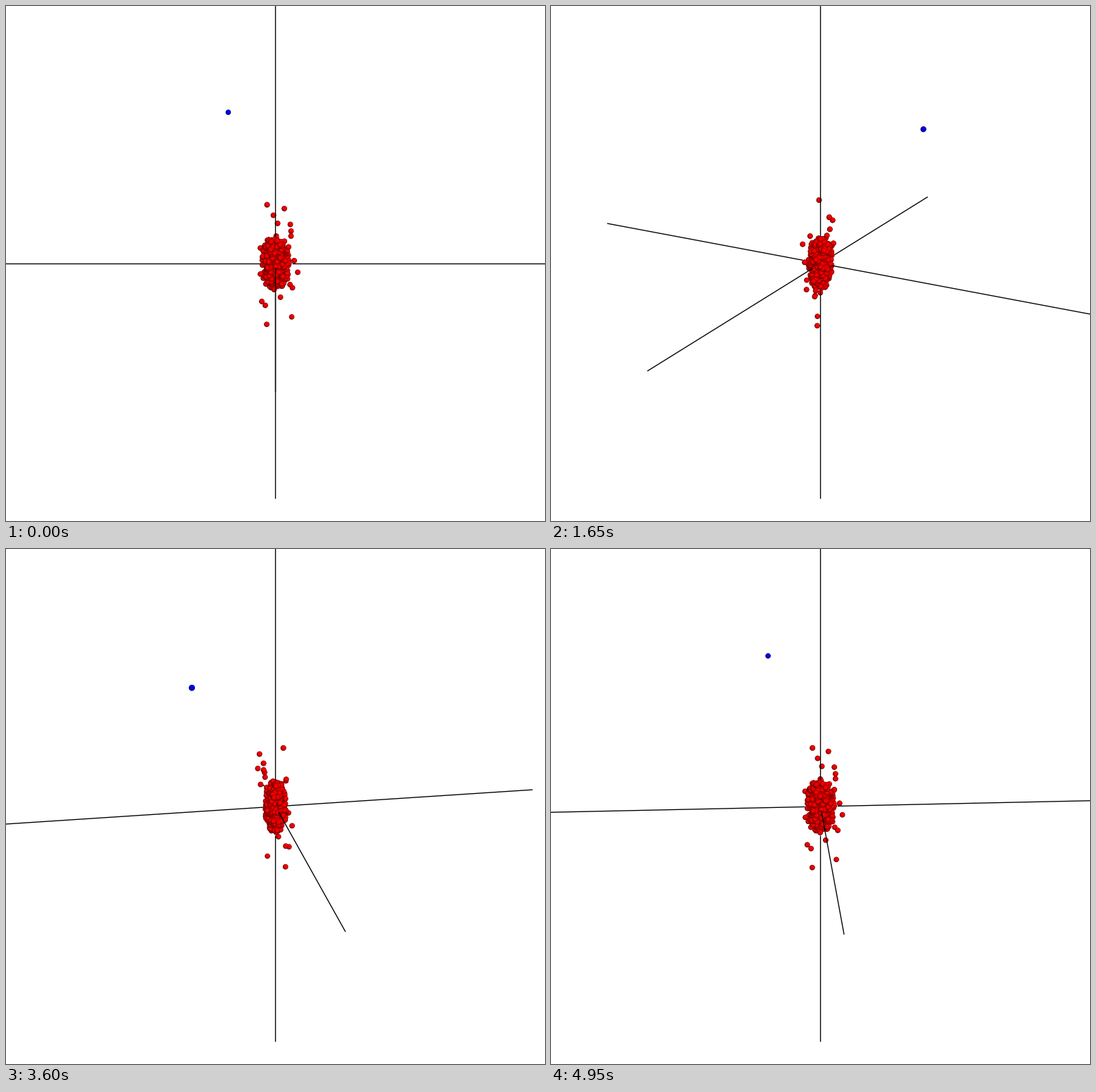
A matplotlib script that plays this animation: 765 by 732 pixels, repeating every 5 s.

```python
import numpy as np
import matplotlib.pyplot as plt
from matplotlib.animation import FuncAnimation

W, H, DPI = 765, 732, 64
FRAMES, INTERVAL = 100, 50
CX, CY = W / 2, H / 2

# Camera: 30 degree field of view, raised by 20 degrees, axes of length 1
DIST = 3.5
FOCAL = CY / np.tan(np.radians(15))
SIN, COS = np.sin(np.radians(20)), np.cos(np.radians(20))
UNIT = FOCAL / DIST
RADIUS = 0.01

# Stray points as seen at the start: right, away, up (pixels)
STRAYS = np.array([
    (-12, -9, 83.5), (12.5, 20.6, 78), (-3, 17.6, 68.5), (3, 16.5, 57),
    (21, 21.5, 55.5), (22, 11.7, 46), (22, 11, 39), (31.5, 6, -12.5),
    (26.5, -11, 4), (24, -9.4, -34.5), (20.5, 3.5, -30), (23, 7.4, -76),
    (-12.5, -12, -86.5), (-14.5, -16.8, -59.5), (-19.5, -11, -54),
    (7, -5.6, -48), (-2, -24, -37), (0, -19, -17), (2, -16, 32),
    (1, 21, 39), (18.5, -19, 23.5), (-21.5, 6.6, 22), (-21.5, 0, -15),
])


def unproject(seen):
    """Turn screen offsets with known distance into world points."""
    x, away, up = seen.T / UNIT
    z = (up - away * SIN) / COS
    shrink = 1 - (z * SIN - away * COS) / DIST
    return np.column_stack([x, away, z]) * shrink[:, None]


def make_core(count):
    rng = np.random.default_rng(7)
    box = rng.uniform(-1, 1, (count * 3, 3))
    inside = (np.abs(box) ** 2.5).sum(axis=1) < 1
    return box[inside][:count] * np.array([20, 15, 38.5]) / UNIT


def project(points, angle):
    """Spin about the vertical axis; return screen x, y and depth."""
    x, y, z = points.T
    c, s = np.cos(angle), np.sin(angle)
    right, away = x * c + y * s, y * c - x * s
    depth = DIST + away * COS - z * SIN
    up = z * COS + away * SIN
    return CX + FOCAL * right / depth, CY - FOCAL * up / depth, depth


def shades(rgb, levels=(0.42, 0.74, 0.95)):
    return [tuple(v * k for v in rgb) for k in levels]


blue_turn = np.radians(-29.9)
blue = np.array([[0.3568 * np.sin(blue_turn), 0.3568 * np.cos(blue_turn), 0.4937]])
balls = np.vstack([make_core(430), unproject(STRAYS), blue])
ball_colors = np.array([shades((1, 0, 0))] * (len(balls) - 1) + [shades((0, 0, 1))])

# Each ball is three nested discs, the lighter ones nudged to the light
LAYER_SIZE = np.array([1, 0.88, 0.64])
LAYER_SHIFT = np.array([0, 0.08, 0.16])

# Axes are sampled finely near the middle, where balls can cover them
steps = np.concatenate([[-1], np.linspace(-0.28, 0.28, 281), [1]])
axis_points = [np.outer(steps, unit) for unit in np.eye(3)]

fig = plt.figure(figsize=(W / DPI, H / DPI), dpi=DPI, facecolor="white")
ax = fig.add_axes([0, 0, 1, 1])
ax.set_xlim(0, W)
ax.set_ylim(H, 0)
ax.axis("off")

POINT = 72 / DPI
discs = ax.scatter(np.zeros(len(balls) * 3), np.zeros(len(balls) * 3),
                   linewidths=0, zorder=1)
lines = [ax.plot([], [], color="black", lw=1.35 * POINT, zorder=2,
                 solid_capstyle="butt")[0] for _ in axis_points]


def covered(px, py, depth, bx, by, bdepth, br):
    gap = ((px[:, None] - bx) ** 2 + (py[:, None] - by) ** 2) / br ** 2
    front = bdepth - RADIUS * np.sqrt(np.clip(1 - gap, 0, 1))
    return ((gap < 1) & (front < depth[:, None])).any(axis=1)


def draw(frame):
    angle = 2 * np.pi * frame / FRAMES
    bx, by, bdepth = project(balls, angle)
    br = FOCAL * RADIUS / bdepth

    order = np.argsort(-bdepth)
    r = br[order, None]
    dx = bx[order, None] + r * LAYER_SHIFT
    dy = by[order, None] - r * LAYER_SHIFT
    discs.set_offsets(np.column_stack([dx.ravel(), dy.ravel()]))
    discs.set_sizes(((2 * POINT * r * LAYER_SIZE) ** 2).ravel())
    discs.set_facecolors(ball_colors[order].reshape(-1, 3))

    for line, points in zip(lines, axis_points):
        px, py, depth = project(points, angle)
        hidden = covered(px, py, depth, bx, by, bdepth, br)
        line.set_data(px, np.where(hidden, np.nan, py))
    return [discs, *lines]


anim = FuncAnimation(fig, draw, frames=FRAMES, interval=INTERVAL,
                     repeat=True, repeat_delay=0, blit=False)
plt.show()
```
